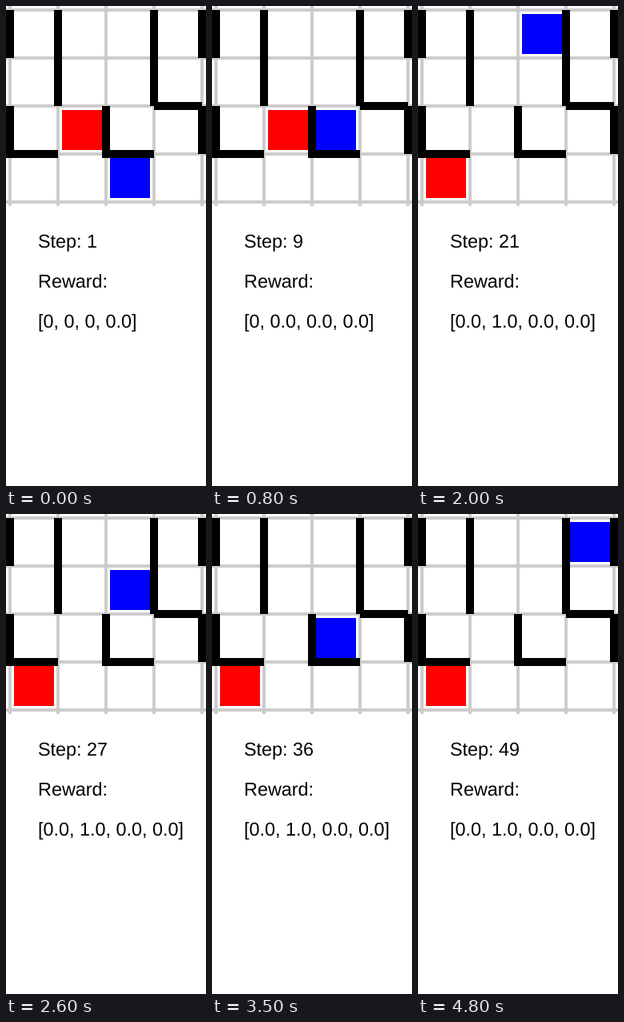
An HTML page that plays this animation: 250x600 px, repeating every 4900 ms.

```html
<!DOCTYPE html>
<html lang="en">
<head>
<meta charset="utf-8">
<title>Grid walk</title>
<style>
  html, body { margin: 0; width: 100%; height: 100%; overflow: hidden; background: #fff; }
  svg { display: block; }
  text { font: 23.4px "Liberation Sans", Arial, sans-serif; text-rendering: geometricPrecision; }
</style>
</head>
<body>
<svg width="250" height="600" viewBox="0 0 250 600">
  <path id="grid" stroke="#ccc" stroke-width="4"/>
  <rect id="goal" width="50" height="50" fill="#f00"/>
  <rect id="agent" width="50" height="50" fill="#00f"/>
  <path stroke="#000" stroke-width="10" fill="none"
    d="M5 5v60m0 60v60h60M65 5v120M125 125v60h60M185 5v120M245 5v60m0 60v60M185 125h60"/>
  <text id="step" x="40" y="302"></text>
  <text x="40" y="352">Reward:</text>
  <text id="reward" x="40" y="402"></text>
</svg>
<script>
const STEP_MS = 100, SIZE = 4, CELL = 60;
const ACTIONS = "UDLR";
// One action per step; a dot is a step without movement.
const WALK = "RRLLDRDD.RLUD..ULDDR.DU...D..D.R..L..RDD.D.U.....";
const START = { col: 1, row: 3 };

const el = id => document.getElementById(id);
const wrap = n => (n + SIZE) % SIZE;
const same = (a, b) => a.col === b.col && a.row === b.row;

function move({ col, row }, action) {
  const dx = (action === "R") - (action === "L");
  const dy = (action === "D") - (action === "U");
  return { col: wrap(col + dx), row: wrap(row + dy) };
}

// Walks the grid; reaching the goal pays 1 and starts a new round.
function simulate() {
  let agent = START, goal = { col: 1, row: 2 };
  const rewards = ["0", "0", "0", "0"];
  return [...WALK].map(action => {
    if (same(agent, goal)) {
      agent = START;
      goal = { col: 0, row: 3 };
    }
    agent = move(agent, action);
    const i = ACTIONS.indexOf(action);
    if (same(agent, goal)) rewards[i] = "1.0";
    else if (rewards[i] === "0") rewards[i] = "0.0";
    return { agent, goal, reward: `[${rewards.join(", ")}]` };
  });
}

function place(id, { col, row }) {
  el(id).setAttribute("x", 10 + col * CELL);
  el(id).setAttribute("y", 10 + row * CELL);
}

let lines = "";
for (let p = 5; p < 250; p += CELL) lines += `M${p} 0V250M0 ${p}H250`;
el("grid").setAttribute("d", lines);

const states = simulate();

function draw(index) {
  const { agent, goal, reward } = states[index];
  place("agent", agent);
  place("goal", goal);
  el("step").textContent = `Step: ${index + 1}`;
  el("reward").textContent = reward;
}

const start = performance.now();
let shown = 0;
draw(shown);

function tick() {
  const index = Math.floor((performance.now() - start) / STEP_MS) % states.length;
  if (index !== shown) draw(shown = index);
  requestAnimationFrame(tick);
}
requestAnimationFrame(tick);
</script>
</body>
</html>
```
